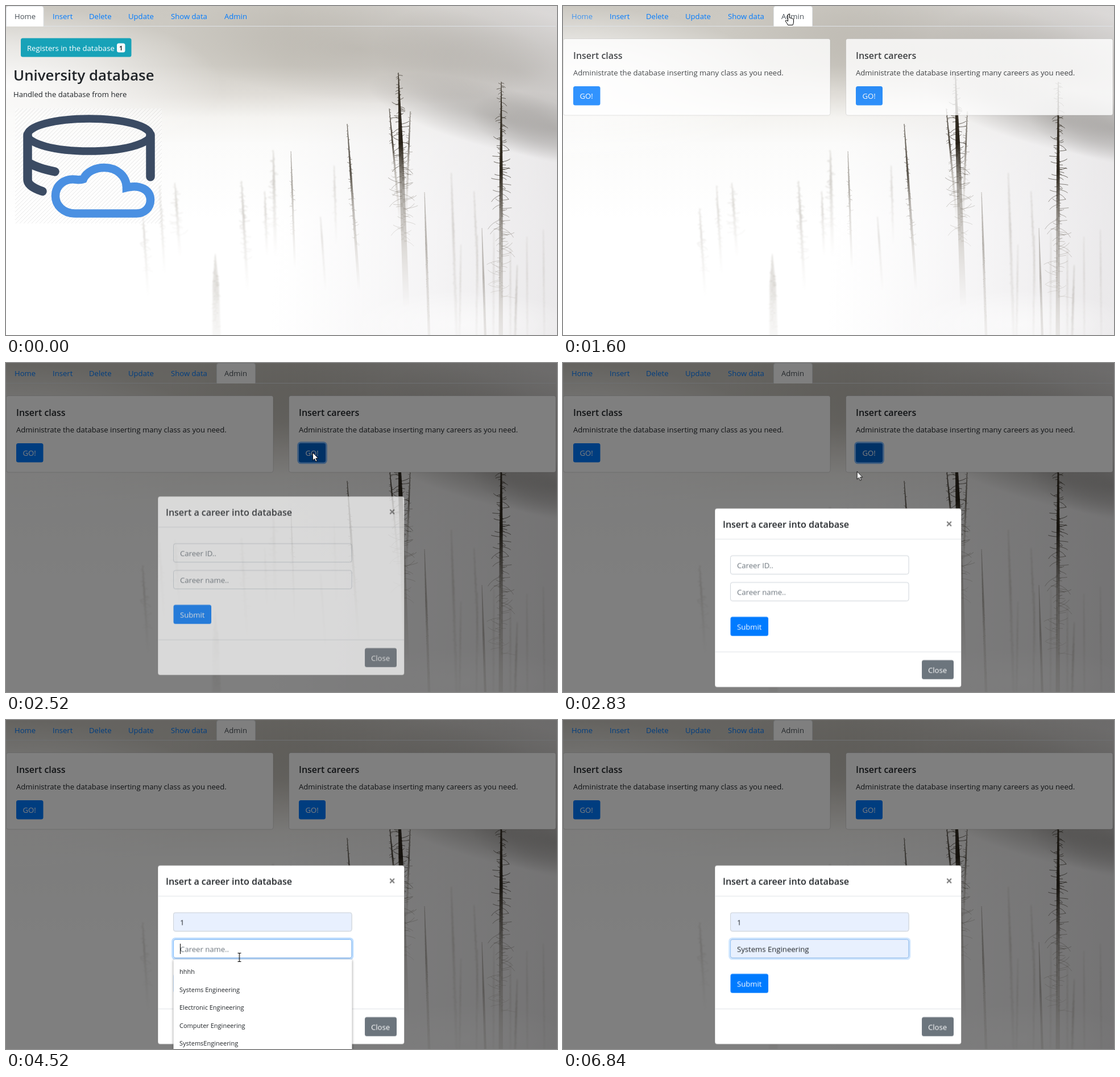
Write an HTML page with a canvas that moves like this. It is 969 px wide and 578 px high and loops after 6930 ms.

```html
<!DOCTYPE html>
<html lang="en">
<head>
<meta charset="utf-8">
<title>University database</title>
<style>
html, body { margin: 0; width: 100%; height: 100%; overflow: hidden; background: #fff; }
canvas, svg { position: absolute; left: 0; top: 0; width: 969px; height: 578px; }
svg { font: 13.13px "Open Sans", "Noto Sans", sans-serif; fill: #212529; }
.h { font-size: 16px; font-weight: 600; }
.h2 { font-size: 25.8px; font-weight: 600; }
.link { fill: #007bff; }
.tab { fill: #495057; }
.w { fill: #fff; }
.ph { fill: #6c757d; }
.small { font-size: 11px; }
.btn { fill: #007bff; }
.card { fill: #fff; stroke: #000; stroke-opacity: .125; }
.field { fill: #fff; stroke: #ced4da; }
.filled { fill: #e8f0fe; stroke: #ced4da; }
.ring { fill: none; stroke: #007bff; stroke-opacity: .25; stroke-width: 2.8; }
.edge { fill: none; stroke: #80bdff; }
.line { stroke: #dee2e6; }
.drop { fill: #fff; filter: drop-shadow(0 1px 2px #0007); }
.hover { fill: #e8e8ec; }
.caret { stroke: #000; }

/* one shared 6.93 s timeline */
.k { animation: 6.93s step-end infinite; }
.l { animation: 6.93s linear infinite; }

#homeTab { animation-name: until-click; }
@keyframes until-click { 0% { opacity: 1 } 18.6%, 100% { opacity: 0 } }
#homeLink { animation-name: home-link; }
@keyframes home-link { 0% { opacity: 0 } 18.6% { opacity: .7 } 23.5%, 100% { opacity: 1 } }
#adminLink { animation-name: until-click; }
#adminTab { animation-name: after-click; }
@keyframes after-click { 0% { opacity: 0 } 18.6%, 100% { opacity: 1 } }
#adminHover { animation-name: admin-hover; }
@keyframes admin-hover { 0% { opacity: 0 } 14.6% { opacity: 1 } 18.6%, 100% { opacity: 0 } }
#home { animation-name: home-out; }
@keyframes home-out { 0%, 18.61% { opacity: 1 } 20.78%, 100% { opacity: 0 } }
#cards { animation-name: cards-in; }
@keyframes cards-in { 0%, 21.36% { opacity: 0 } 23.52%, 100% { opacity: 1 } }
#goHover { animation-name: go-hover; }
@keyframes go-hover { 0% { opacity: 0 } 28.6% { opacity: 1 } 34%, 100% { opacity: 0 } }
#goFocus { animation-name: go-focus; }
@keyframes go-focus { 0%, 31% { opacity: 0 } 32.5%, 45.1% { opacity: 1 } 46.6%, 100% { opacity: 0 } }
#shade { animation-name: shade; }
@keyframes shade { 0%, 32.57% { opacity: 0 } 34.73%, 100% { opacity: .5 } }
#modal { animation-name: modal-fade; }
@keyframes modal-fade { 0%, 34.85% { opacity: 0 } 37.01%, 100% { opacity: 1 } }
#slide { animation-name: modal-slide; }
@keyframes modal-slide {
  0%, 34.85% { transform: translateY(-43.5px); animation-timing-function: ease-out }
  39.18%, 100% { transform: none }
}
#focus1 { animation-name: focus1; }
@keyframes focus1 { 0%, 45.17% { opacity: 0 } 47.3%, 60.6% { opacity: 1 } 62.2%, 100% { opacity: 0 } }
#focus2 { animation-name: focus2; }
@keyframes focus2 { 0%, 60.6% { opacity: 0 } 62.2%, 98.5% { opacity: 1 } 98.7%, 100% { opacity: .75 } }
#value1 { animation-name: value1; }
@keyframes value1 { 0% { opacity: 0 } 48.5%, 100% { opacity: 1 } }
#value2 { animation-name: value2; }
@keyframes value2 { 0% { opacity: 0 } 71%, 100% { opacity: 1 } }
#caret1 { animation-name: caret1; }
@keyframes caret1 { 0% { opacity: 0 } 45.17% { opacity: 1 } 52.96%, 100% { opacity: 0 } }
#caret2 { animation-name: caret2; }
@keyframes caret2 { 0% { opacity: 0 } 60.6% { opacity: 1 } 68.7%, 100% { opacity: 0 } }
#caret3 { animation-name: caret3; }
@keyframes caret3 { 0% { opacity: 0 } 74.3% { opacity: 1 } 79.65% { opacity: 0 } 86.4% { opacity: 1 } 94%, 100% { opacity: 0 } }
#list1 { animation-name: list1; }
@keyframes list1 { 0% { opacity: 0 } 46.3% { opacity: 1 } 52.96%, 100% { opacity: 0 } }
#row1 { animation-name: value1; }
#list2 { animation-name: list2; }
@keyframes list2 { 0% { opacity: 0 } 61.76% { opacity: 1 } 74.3%, 100% { opacity: 0 } }
#row2 { animation-name: value2; }
#submitHover { animation-name: submit-hover; }
@keyframes submit-hover { 0% { opacity: 0 } 87.9% { opacity: 1 } 89.6%, 100% { opacity: 0 } }

#cursor { animation: cursor 6.93s ease-in-out infinite; }
@keyframes cursor {
  0%, 1.4% { transform: translate(876px, 590px) }
  1.9% { transform: translate(860px, 562px) }
  10.8% { transform: translate(292px, 118px) }
  12% { transform: translate(278px, 100px) }
  15.3%, 24.1% { transform: translate(397px, 14px) }
  29.5%, 39.5% { transform: translate(539px, 157px) }
  44.2%, 46.5% { transform: translate(409px, 350px) }
  49.6%, 50.7% { transform: translate(404.5px, 400px) }
  50.79%, 57.6% { transform: translate(404.5px, 410px) }
  60.6% { transform: translate(410px, 411px) }
  63%, 68.7% { transform: translate(410.5px, 417px) }
  71.9%, 86.4% { transform: translate(402px, 468px) }
  88.7% { transform: translate(342px, 463px) }
  94% { transform: translate(888px, 572px) }
  94.1%, 100% { transform: translate(900px, 600px) }
}
#arrow { animation-name: arrow; }
@keyframes arrow {
  0% { opacity: 1 } 14.6% { opacity: 0 } 24.9% { opacity: 1 } 28.6% { opacity: 0 } 32% { opacity: 1 }
  43.6% { opacity: 0 } 47.6% { opacity: 1 } 52.96% { opacity: 0 } 69.2% { opacity: 1 }
  87.9% { opacity: 0 } 89.6%, 100% { opacity: 1 }
}
#hand { animation-name: hand; }
@keyframes hand {
  0% { opacity: 0 } 14.6% { opacity: 1 } 24.9% { opacity: 0 } 28.6% { opacity: 1 } 32% { opacity: 0 }
  87.9% { opacity: 1 } 89.6%, 100% { opacity: 0 }
}
#beam { animation-name: beam; }
@keyframes beam {
  0% { opacity: 0 } 43.6% { opacity: 1 } 47.6% { opacity: 0 } 52.96% { opacity: 1 } 69.2%, 100% { opacity: 0 }
}
</style>
</head>
<body>
<canvas id="fog" width="969" height="578"></canvas>
<svg viewBox="0 0 969 578">
  <defs>
    <pattern id="hatch" width="7" height="7" patternUnits="userSpaceOnUse">
      <path d="M-1 8L8 -1" stroke="#000" stroke-opacity=".09"/>
    </pattern>
  </defs>

  <path class="line" d="M0 35.5H967"/>
  <g id="homeTab" class="k">
    <path class="w line" d="M.5 36V4Q.5 .5 4 .5H62.5Q66 .5 66 4V36"/>
    <text class="tab" x="15" y="22.5">Home</text>
  </g>
  <text id="homeLink" class="link k" x="15" y="22.5">Home</text>
  <g class="link">
    <text x="82" y="22.5">Insert</text>
    <text x="146" y="22.5">Delete</text>
    <text x="215" y="22.5">Update</text>
    <text x="290" y="22.5">Show data</text>
    <text id="adminLink" class="k" x="384" y="22.5">Admin</text>
  </g>
  <path id="adminHover" class="k" fill="none" stroke="#e9ecef" d="M370.5 36V4Q370.5 .5 374 .5H435Q438.5 .5 438.5 4V36"/>
  <g id="adminTab" class="k">
    <path class="w line" d="M370.5 36V4Q370.5 .5 374 .5H435Q438.5 .5 438.5 4V36"/>
    <text class="tab" x="384" y="22.5">Admin</text>
  </g>

  <g id="home" class="l">
    <rect x="26" y="56.5" width="194.5" height="33" rx="3.5" fill="#17a2b8"/>
    <text class="w" x="37" y="78.5">Registers in the database</text>
    <rect x="195" y="65.5" width="14.5" height="16" rx="3.5" fill="#f8f9fa"/>
    <text x="202.2" y="77.5" text-anchor="middle" font-size="10" font-weight="700">1</text>
    <text class="h2" x="13" y="131">University database</text>
    <text x="13" y="159.5">Handled the database from here</text>
    <rect x="16" y="180" width="258" height="202" fill="#fff" fill-opacity=".35"/>
    <rect x="16" y="180" width="258" height="202" fill="url(#hatch)"/>
    <g fill="none" stroke="#3b4b63" stroke-width="15.5" stroke-linecap="round">
      <ellipse cx="146" cy="226.5" rx="108" ry="28.5" stroke-width="13.5"/>
      <path d="M38 226V305Q38 317 64 325.5M38 274Q52 284 86 291M254 226V300"/>
      <path stroke="#4a90e2" stroke-width="14.5" d="M121 364.5C101 364.5 87 350 87 334C87 314 104 302 124 305Q130 306 136 304C142 291 157 284 173 284C195 284 212 299 212 319C236 313 254 323 254 341C254 355 243 364.5 229 364.5Z"/>
    </g>
  </g>

  <g id="cards" class="l">
    <rect class="card" x=".5" y="57.5" width="469.5" height="134.5" rx="3.5"/>
    <text class="h" x="18" y="92.5">Insert class</text>
    <text x="18" y="122">Administrate the database inserting many class as you need.</text>
    <rect class="btn" x="18" y="141" width="47.5" height="33.5" rx="3.5"/>
    <text class="w" x="29.5" y="163">GO!</text>
    <rect class="card" x="497.5" y="57.5" width="469.5" height="134.5" rx="3.5"/>
    <text class="h" x="515" y="92.5">Insert careers</text>
    <text x="515" y="122">Administrate the database inserting many careers as you need.</text>
    <rect class="btn" x="515" y="141" width="47" height="33.5" rx="3.5"/>
    <rect id="goHover" class="k" x="515" y="141" width="47" height="33.5" rx="3.5" fill="#0069d9"/>
    <g id="goFocus" class="l">
      <rect x="515" y="141" width="47" height="33.5" rx="3.5" fill="#0062cc"/>
      <rect class="ring" x="513.6" y="139.6" width="49.8" height="36.3" rx="5" style="stroke-opacity:.5"/>
    </g>
    <text class="w" x="526.5" y="163">GO!</text>
  </g>

  <rect id="shade" class="l" width="969" height="578" fill="#000"/>

  <g id="modal" class="l"><g id="slide" class="l">
    <rect x="267" y="255.5" width="433.5" height="314" rx="4" fill="#fff" stroke="#000" stroke-opacity=".2"/>
    <path class="line" d="M267.5 309.5H700M267.5 507.5H700"/>
    <text class="h" x="281" y="289">Insert a career into database</text>
    <path d="M675.3 278.8l7.6 7.6m0 -7.6l-7.6 7.6" stroke="#7f7f7f" stroke-width="2.2"/>

    <rect class="field" x="294.5" y="338.5" width="313.5" height="32.5" rx="3.5"/>
    <text class="ph" x="306" y="360">Career ID..</text>
    <g id="value1" class="k">
      <rect class="filled" x="294.5" y="338.5" width="313.5" height="32.5" rx="3.5"/>
      <text x="306" y="360">1</text>
    </g>
    <g id="focus1" class="l">
      <rect class="edge" x="294.5" y="338.5" width="313.5" height="32.5" rx="3.5"/>
      <rect class="ring" x="292.6" y="336.6" width="317.3" height="36.3" rx="5"/>
    </g>
    <path id="caret1" class="caret k" d="M306.5 346V364"/>

    <rect class="field" x="294.5" y="385.5" width="313.5" height="32.5" rx="3.5"/>
    <text class="ph" x="306" y="407">Career name..</text>
    <g id="value2" class="k">
      <rect class="filled" x="294.5" y="385.5" width="313.5" height="32.5" rx="3.5"/>
      <text x="306" y="407">Systems Engineering</text>
    </g>
    <g id="focus2" class="l">
      <rect class="edge" x="294.5" y="385.5" width="313.5" height="32.5" rx="3.5"/>
      <rect class="ring" x="292.6" y="383.6" width="317.3" height="36.3" rx="5"/>
    </g>
    <path id="caret2" class="caret k" d="M306.5 393V411"/>
    <path id="caret3" class="caret k" d="M432.5 393V411"/>

    <rect class="btn" x="294.5" y="446" width="66.5" height="33.5" rx="3.5"/>
    <rect id="submitHover" class="k" x="294.5" y="446" width="66.5" height="33.5" rx="3.5" fill="#0069d9"/>
    <text class="w" x="306" y="468">Submit</text>
    <rect x="631" y="522" width="56" height="33.5" rx="3.5" fill="#6c757d"/>
    <text class="w" x="642" y="544">Close</text>
  </g></g>

  <g id="list1" class="small k">
    <rect class="drop" x="294.5" y="373.5" width="314" height="170" rx="2"/>
    <rect id="row1" class="hover k" x="294.5" y="379" width="314" height="31.5"/>
    <text x="305" y="399">1</text>
    <text x="305" y="430.5">2</text>
    <text x="305" y="462">3</text>
    <text x="305" y="493.5">4</text>
    <text x="305" y="525">5</text>
  </g>
  <g id="list2" class="small k">
    <rect class="drop" x="294.5" y="420.5" width="314" height="170" rx="2"/>
    <rect id="row2" class="hover k" x="294.5" y="458" width="314" height="31.5"/>
    <text x="305" y="446">hhhh</text>
    <text x="305" y="477.5">Systems Engineering</text>
    <text x="305" y="509">Electronic Engineering</text>
    <text x="305" y="540.5">Computer Engineering</text>
    <text x="305" y="572">SystemsEngineering</text>
  </g>

  <g id="cursor">
    <path id="arrow" class="k w" stroke="#000" stroke-width=".9" d="M.5 .5V14L3.6 11.2L5.8 16.2L8 15.2L5.8 10.4H10Z"/>
    <path id="hand" class="k w" stroke="#000" stroke-width="1" stroke-linejoin="round" d="M-1.5 1Q0 -.5 1.5 1V7Q3 6 4 7.5Q5.5 6.8 6.5 8.3Q8.5 8 8.5 10V14Q8.3 17 7 19.5H-1.5Q-2.5 17 -5.5 13Q-6 10.5 -3.5 11L-1.5 13Z"/>
    <path id="beam" class="k" fill="none" stroke="#000" stroke-width="1.2" d="M-3 -7.5H-1Q0 -7.5 0 -6.5V6.5Q0 7.5 -1 7.5H-3M3 -7.5H1Q0 -7.5 0 -6.5M0 6.5Q0 7.5 1 7.5H3"/>
  </g>
</svg>
<script>
const ctx = document.getElementById('fog').getContext('2d');
const W = 969, H = 578;

let seed = 11;
function rand() {
  seed = (seed * 16807) % 2147483647;
  return seed / 2147483647;
}

function wash(gradient, stops) {
  stops.forEach(([at, color]) => gradient.addColorStop(at, color));
  ctx.fillStyle = gradient;
  ctx.fillRect(-2 * W, -2 * H, 5 * W, 5 * H);
}

// soft elliptical patch of one tone
function cloud(x, y, rx, ry, rgb, alpha, tilt = 0) {
  ctx.save();
  ctx.translate(x, y);
  ctx.rotate(tilt);
  ctx.scale(1, ry / rx);
  wash(ctx.createRadialGradient(0, 0, 0, 0, 0, rx),
    [[0, `rgba(${rgb},${alpha})`], [.5, `rgba(${rgb},${alpha * .6})`], [1, `rgba(${rgb},0)`]]);
  ctx.restore();
}

function sky() {
  wash(ctx.createLinearGradient(0, 0, 0, H),
    [[0, '#cbc8c1'], [.18, '#cfccc5'], [.27, '#e0ddd8'], [.34, '#f5f4f1'], [.42, '#fbfbfa'], [.65, '#fff'], [1, '#fff']]);
  wash(ctx.createLinearGradient(480, 300, W, 330),
    [[0, 'rgba(233,231,234,0)'], [1, 'rgba(226,224,226,.7)']]);
  cloud(0, 140, 380, 140, '255,255,255', .9);
  cloud(620, 75, 340, 95, '160,155,146', .4, .08);
  cloud(900, 115, 260, 110, '140,136,129', .32, .2);
  cloud(860, 195, 230, 55, '130,127,122', .4, .25);
  cloud(965, 215, 150, 60, '125,122,119', .35, .2);
  cloud(800, 560, 200, 60, '255,255,255', .6);
}

function tree([x0, y0, x1, y1, w, reach, dark]) {
  const tone = (s, a) => `rgba(${s},${s - 7},${s - 18},${a})`;
  const g = ctx.createLinearGradient(0, y0, 0, y1);
  const s = 165 - 140 * dark, a = .22 + .7 * dark;
  g.addColorStop(0, tone(s, a * .85));
  g.addColorStop(.3, tone(s, a));
  g.addColorStop(.5, tone(s + 75 * dark, a * .55));
  g.addColorStop(.75, tone(170, a * .35));
  g.addColorStop(1, tone(185, 0));
  ctx.fillStyle = ctx.strokeStyle = g;
  ctx.filter = dark < .3 ? 'blur(1px)' : 'none';

  // slim tip, then a nearly even trunk
  const kx = x0 + (x1 - x0) * .3, ky = y0 + (y1 - y0) * .3;
  ctx.beginPath();
  ctx.moveTo(x0 - .5, y0);
  ctx.lineTo(x0 + .5, y0);
  ctx.lineTo(kx + w * .35, ky);
  ctx.lineTo(x1 + w / 2, y1);
  ctx.lineTo(x1 - w / 2, y1);
  ctx.lineTo(kx - w * .35, ky);
  ctx.fill();

  ctx.lineWidth = dark < .3 ? 1.1 : .7;
  ctx.beginPath();
  for (let y = y0 + 2; y < y0 + (y1 - y0) * .72; y += 2.4) {
    const t = (y - y0) / (y1 - y0), x = x0 + (x1 - x0) * t;
    const len = reach * (.3 + .7 * Math.min(1, t * 2)) * (.1 + .9 * rand() ** 1.6) * (rand() < .5 ? -1 : 1);
    const drop = Math.abs(len) * (rand() * 1.4 - .6);
    ctx.moveTo(x, y);
    ctx.quadraticCurveTo(x + len * .7, y + drop * .3, x + len, y + drop);
  }
  ctx.stroke();
  ctx.filter = 'none';
}

// top x, top y, foot x, foot y, foot width, branch reach, darkness
const trees = [
  [368, 435, 371, 620, 16, 10, .06], [240, 355, 250, 510, 4, 11, .06],
  [270, 315, 279, 470, 4, 8, .08], [297, 310, 306, 440, 5, 17, .08],
  [414, 307, 425, 500, 5, 14, .14], [455, 325, 459, 440, 4, 7, .1],
  [470, 253, 474, 440, 6, 14, .14], [501, 255, 508, 460, 4, 7, .4],
  [577, 280, 581, 420, 3, 6, .1], [553, 370, 562, 500, 3, 1, .12],
  [600, 207, 621, 500, 5, 8, .8], [736, 327, 746, 640, 5, 3, .34],
  [783, 293, 794, 620, 5, 4, .1], [823, 325, 832, 520, 3, 4, .1],
  [837, 390, 846, 680, 5, 1, .32], [899, 455, 893, 660, 4, 3, .18],
  [674, 180, 693, 380, 4, 9, .85], [711, 185, 703, 380, 4, 10, .65]
];
const giants = [[690, 117, 704, 530, 11, 27, 1], [871, 133, 870, 660, 8, 25, .98]];

sky();
trees.forEach(tree);
giants.forEach(tree);
for (let i = 0; i < 6; i++) tree([800 + i * 29, 380 + rand() * 60, 797 + i * 30, 620, 3, 2, .05]);
</script>
</body>
</html>
```
